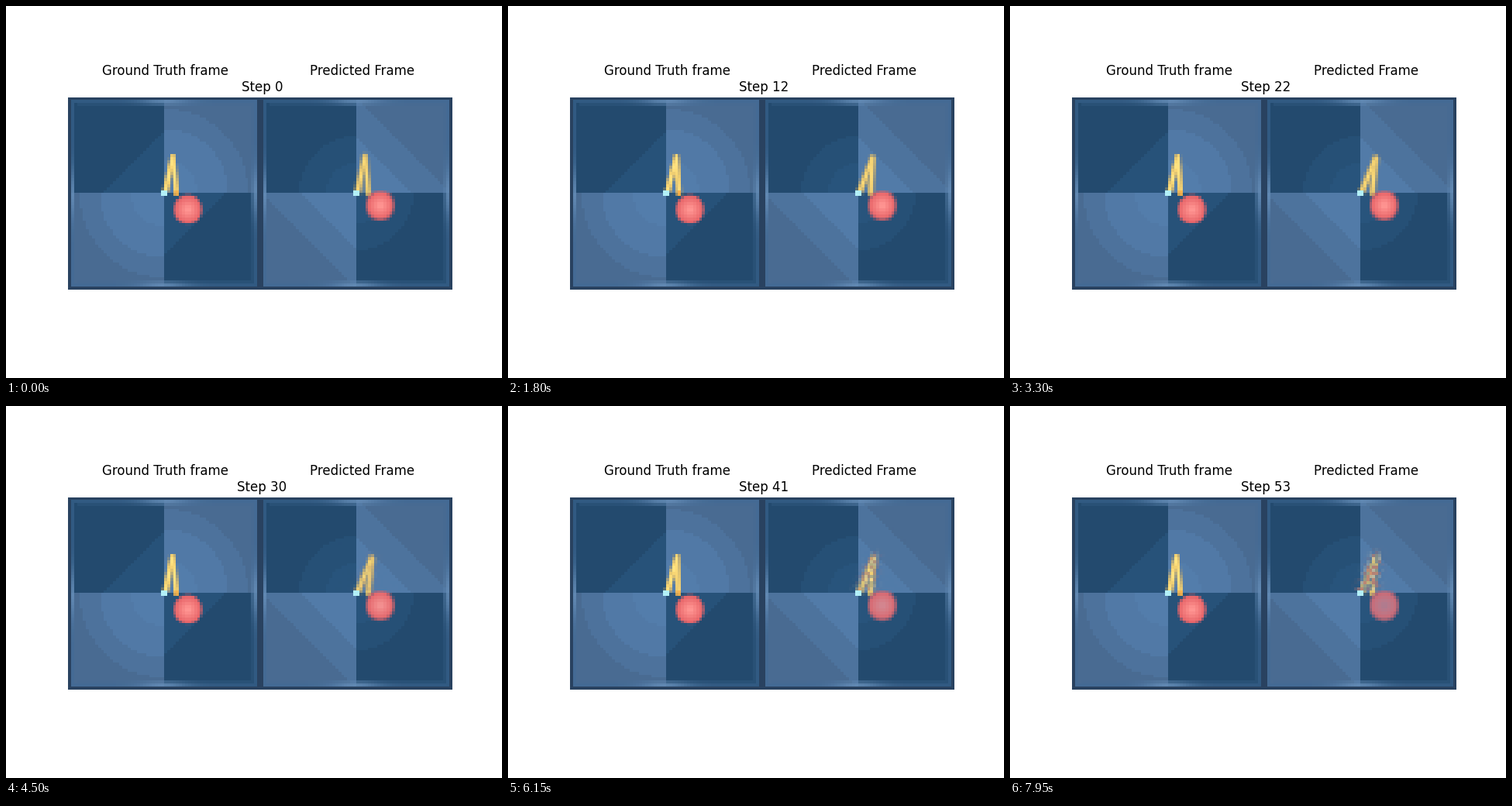
A matplotlib script for the animation above (8 s loop, 640 px wide and 480 px high).

```python
import numpy as np
import matplotlib.pyplot as plt
from matplotlib.animation import FuncAnimation

N = 64                      # cells per panel side
INTERVAL, FRAMES, HOLD = 50, 160, 3

Y, X = np.mgrid[0:N, 0:N] + 0.5
DX, DY = np.abs(X - 32), np.abs(Y - 32)
RADIUS = np.hypot(DX, DY)
DIAMOND = DX + DY
IS_LIGHT = (X > 32) == (Y < 32)

DARK_OUTER, DARK_INNER = (35, 74, 110), (40, 84, 124)
LIGHT_OUTER, LIGHT_INNER = (73, 107, 146), (83, 125, 171)
BORDER, RIM, GLOW = (41, 66, 96), (64, 106, 150), (108, 148, 190)
HUB = (178, 240, 248)
GOLD, PALE_GOLD, ORANGE = (224, 176, 82), (255, 226, 128), (245, 146, 40)
RED, PINK = (228, 94, 99), (255, 148, 145)

HUB_POINT = 32.4, 31.5
TRUE_BALL, PREDICTED_BALL = (39.95, 37.4), (40, 36.1)


def paint(img, color, alpha):
    alpha = np.clip(alpha, 0, 1)[..., None]
    img[:] = img * (1 - alpha) + np.array(color, float) * alpha


def distance_to(point):
    return np.hypot(X - point[0], Y - point[1])


def segment_distance(a, b):
    a, d = np.array(a), np.subtract(b, a)
    t = np.clip(((X - a[0]) * d[0] + (Y - a[1]) * d[1]) / (d @ d), 0, 1)
    return distance_to(a + t[..., None].transpose(2, 0, 1) * 0 + 0) if False else \
        np.hypot(X - a[0] - t * d[0], Y - a[1] - t * d[1])


def arm_distance(elbow, tip):
    return np.minimum(segment_distance(HUB_POINT, elbow), segment_distance(elbow, tip))


def make_floor(predicted):
    if predicted:
        light = (DIAMOND < 31.5) * 0.45 + (DIAMOND < 19) * 0.45
        dark = (RADIUS < 19) * 0.6 + (RADIUS < 10) * 0.4
    else:
        light = (RADIUS < 28) * 0.4 + (RADIUS < 21.5) * 0.4 + (RADIUS < 11) * 0.2
        dark = (DIAMOND < 20.5) * 0.85
    img = np.empty((N, N, 3))
    img[:] = DARK_OUTER
    paint(img, DARK_INNER, dark)
    paint(img, LIGHT_OUTER, IS_LIGHT * 1.0)
    paint(img, LIGHT_INNER, IS_LIGHT * light)

    edge = 32 - np.maximum(DX, DY)
    along = np.minimum(DX, DY)
    strength = np.where(edge < 2, 0.5, 0.22) * (edge < 3)
    strength[:, 2] *= edge[:, 2] < 2      # the left rim is one cell thinner
    paint(img, RIM, strength)
    paint(img, GLOW, 1.4 * strength * np.exp(-(along / 8) ** 2))
    paint(img, BORDER, (edge < 1) * 1.0)
    return img


def true_pose(step):
    swing = np.cos(2 * np.pi * (step - 16) / 25)
    kick = np.exp(-((step - 16) / 3) ** 2)
    return (35.2 + 0.45 * swing, 19.9), (36.1 + 1.5 * kick, 32)


def predicted_pose(step):
    drift = 1 - np.exp(-(step / 9) ** 2)
    kick = np.exp(-((step - 16) / 3) ** 2)
    return (34.9 + 2.3 * drift, 19.9 + 0.5 * drift), (36 + 0.9 * kick, 32)


def draw_panel(floor, pose, ball, blur):
    img = floor.copy()
    distance = arm_distance(*pose)
    paint(img, GOLD, (1.4 + blur - distance) / (1 + 2 * blur))
    paint(img, PALE_GOLD, (1.15 - distance) * (1 - blur))
    if not blur:
        paint(img, ORANGE, 1.1 - distance_to(pose[1]))
    r = distance_to(ball)
    paint(img, RED, (5.2 + blur - r) / (1 + 2 * blur))
    paint(img, PINK, (4.8 - r) / 4.2)
    paint(img, HUB, (np.maximum(DX, DY) < 1) * 1.0)
    return img


def degrade(img, floor, pose, ball, step):
    """Smear the predicted arm and ball as the rollout drifts."""
    amount = np.clip((step - 26) / 27, 0, 1)
    fade, tint = np.random.default_rng(step).random((2, N, N))
    near_arm = np.exp(-(arm_distance(*pose) / 2) ** 2) * (Y < 31) * amount
    paint(img, (76, 112, 152), near_arm * fade * 0.8)
    paint(img, (196, 116, 108), near_arm * (tint > 0.65) * 0.65)
    paint(img, (228, 208, 172), near_arm * (tint < 0.25) * 0.6)
    r = distance_to(ball)
    paint(img, (140, 112, 142), (r < 5.5) * amount * (0.25 + 0.1 * (5 - r)))


FLOORS = make_floor(False), make_floor(True)


def picture(step):
    true = draw_panel(FLOORS[0], true_pose(step), TRUE_BALL, 0)
    pose = predicted_pose(step)
    predicted = draw_panel(FLOORS[1], pose, PREDICTED_BALL, 0.25)
    degrade(predicted, FLOORS[1], pose, PREDICTED_BALL, step)
    paint(predicted, HUB, (np.maximum(DX, DY) < 1) * 1.0)
    return np.hstack([true, predicted]).astype(np.uint8)


plt.rcParams["font.family"] = "DejaVu Sans"
fig, ax = plt.subplots(figsize=(6.4, 4.8), dpi=100)
ax.axis("off")
image = ax.imshow(picture(0), interpolation="nearest")


def label(x, y, text):
    return fig.text(x / 640, 1 - y / 480, text, fontsize=12, ha="center", va="baseline")


label(205.9, 89, "Ground Truth frame")
label(459.8, 89, "Predicted Frame")
step_label = label(330.3, 110, "Step 0")


def update(frame):
    step = frame // HOLD
    image.set_data(picture(step))
    step_label.set_text(f"Step {step}")
    return image, step_label


anim = FuncAnimation(fig, update, frames=FRAMES, interval=INTERVAL,
                     repeat=True, repeat_delay=0)
plt.show()
```
